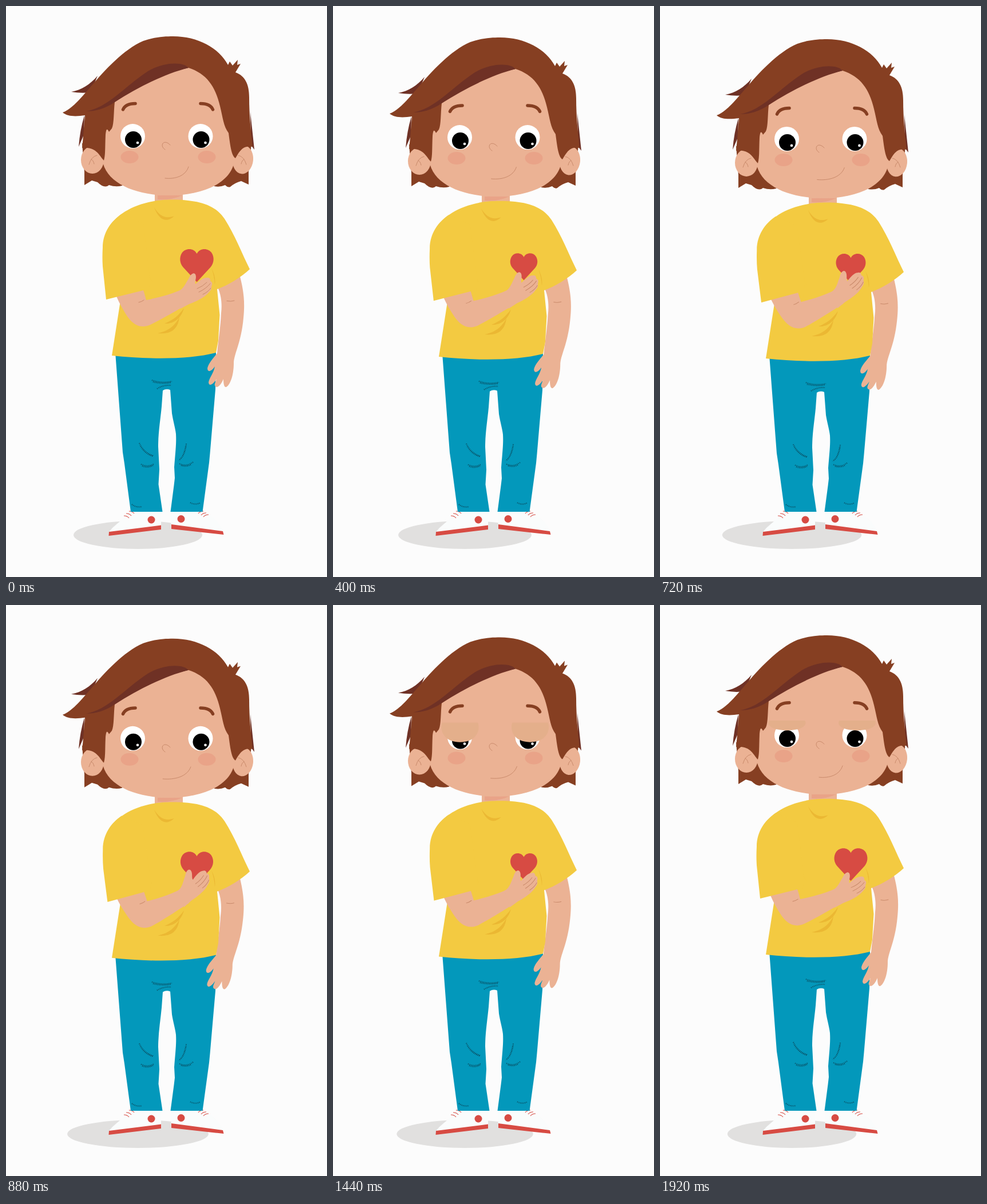
An HTML page that plays this animation: 561 by 998 pixels, repeating every 2000 ms.

```html
<!DOCTYPE html>
<html lang="en">
<head>
<meta charset="utf-8">
<title>Boy with a beating heart</title>
<style>
  html, body { margin: 0; width: 100%; height: 100%; overflow: hidden; background: #fcfcfc; }
  svg { display: block; }
  .skin { fill: #ebb294; }
  .hair { fill: #863f22; }
  .dark { fill: #6f3125; }
  .shirt { fill: #f3ca41; }
  .fold { fill: #ebb833; }
  .jeans { fill: #0398bb; }
  .red { fill: #d74b43; }
  .white { fill: #fff; }
  .shoe { fill: #fafcfc; }
  .lid { fill: #e4af8b; }
  .cheek { fill: #e9a388; }
  .line { fill: none; stroke: #c98a6b; stroke-width: 1; stroke-linecap: round; }
  .brow { fill: none; stroke: #863f22; stroke-width: 5.5; stroke-linecap: round; }
  .lace { fill: none; stroke: #d74b43; stroke-width: 1.2; }
  .crease { fill: none; stroke: #0a5368; stroke-width: 2.2; stroke-dasharray: 1.2 1.5; }
</style>
</head>
<body>
<svg width="561" height="998" viewBox="0 0 561 998">
  <ellipse id="shadow" cx="230.5" cy="924.5" rx="112.5" ry="24.5" fill="#e1e0df"/>

  <g id="shoes">
    <path class="shoe" d="M218 882H271V909L180 920C187 908 207 897 218 882z"/>
    <path class="red" d="M180 919L271 907.500V915L179.500 926z"/>
    <circle class="red" cx="254" cy="898" r="6.500"/>
    <path class="lace" d="M206 891q6 0 9 4M210 887q6 0 9 4M215 883q6 0 9 4"/>
    <path class="shoe" d="M288 882H344C358 890 374 903 380 919L289 908z"/>
    <path class="red" d="M289 906L379 918L380.500 924L289 914z"/>
    <circle class="red" cx="306" cy="896.500" r="6.500"/>
    <path class="lace" d="M345 883q-6 0 -9 4M350 886q-6 0 -9 4M354 889q-6 0 -9 4"/>
  </g>

  <g id="legs">
    <path class="jeans" d="M191 605H367L366 670L356.500 782L355 798L343.500 884H287.500L293.500 838L295 825L294 806C296 780 298 764 297 748C296 738 292 725 290 712L287 671Q280 668 274 672L272 700C270 722 266 745 266 770L268 810L266.500 836L273.500 884H218L207 800L204 780z"/>
    <path class="crease" d="M255 654Q272 660 290 656M257 657Q272 661 289 658M264 669Q275 662 288 663M233 764Q240 780 257 786M235 769Q243 783 257 787M236 801Q248 807 259 800M238 804Q248 808 257 803M315 765Q313 786 302 794M314 770Q310 789 303 793M303 800Q316 806 327 797M306 803Q316 806 324 801M220 871Q227 877 238 875M322 868Q331 873 340 868"/>
  </g>

  <g id="body">
    <path class="skin" d="M260 318H309V345H260z"/>
    <path class="cheek" d="M265 331H308Q288 340 265 338z"/>

    <g id="farArm">
      <path class="skin" d="M368 488C376 502 378 520 376 537C375 560 371 585 369 607C362 616 354 624 352 633C352 641 359 639 365 630C363 642 355 650 354 658C355 666 362 661 368 652C366 658 363 662 366 665C371 669 377 659 380 652C380 660 381 667 385 666C392 662 398 645 398 625C398 608 411 590 415 545C418 515 415 495 407 465z"/>
      <path class="line" d="M386 515.500Q393 517 399 515"/>
    </g>

    <path class="shirt" d="M259 341C275 338 300 338 318 340C347 343 369 352 382 372C400 400 412 432 426 460C410 475 388 488 369 495L373.500 540L371 585L367 606C320 618 250 618 185 611L200 515L178 390C192 365 220 348 259 341z"/>
    <path class="fold" d="M259 352C269 369 281 372 294 367C282 379 268 376 259 352zM242 443Q246 468 256 483Q246 467 242 443zM359 458Q367 473 365 487Q364 471 359 458zM303 544C300 568 285 574 265 572C284 568 294 560 303 544zM311 528C306 547 292 556 277 555C292 549 302 541 311 528z"/>

    <path id="heart" class="red" d="M0-20.500C-5-31-20-31-26-22C-31-14-30-4-24 3L0 29L24 3C30-4 31-14 26-22C20-31 5-31 0-20.500z"/>

    <g id="nearArm">
      <g id="forearm">
        <path class="skin" d="M190 500L239 492L245 514C270 509 290 503 306 496L318 521C300 531 270 549 250 558C231 565 219 553 211 541C203 528 197 518 190 500z"/>
        <path class="line" d="M232 518Q237 517 241 514"/>
        <g id="hand">
          <path class="skin" d="M300 499C310 496 314 484 319 477C323 468 328 465 331 469C334 475 329 482 331 486C338 480 346 474 351 475C355 474 358 477 357 481C361 482 361 487 359 490C360 495 357 498 354 501C346 511 328 518 320 521L305 529z"/>
          <path class="line" d="M334 494Q344 490 351 483M337 500Q350 494 357 485M344 504Q353 500 358 493"/>
        </g>
      </g>
      <path class="shirt" d="M203 363C184 375 169 396 169 422Q168 440 169 455L175 513L240 497L247 512L252 480L240 380z"/>
    </g>

    <g id="head">
      <path class="hair" d="M133 240L137 290V313L150 305L160 308Q172 320 180 313Q192 317 203 314L240 250zM429 240L424 290V312L411 306Q400 309 392 316Q388 318 383 313Q374 317 364 315L330 250z"/>
      <ellipse class="skin" cx="151" cy="269" rx="20" ry="24"/>
      <ellipse class="skin" cx="414" cy="268.500" rx="18" ry="25" transform="rotate(6 414 268)"/>
      <path class="skin" d="M168 262C168 307 223 331 285 331C347 331 400 307 400 262L385 130L319 100L180 160z"/>
      <path class="line" d="M159 261Q149 263 145 277M149 268Q153 270 154 276M406 261Q416 263 420 277M416 268Q412 270 411 276"/>
      <path class="dark" d="M114 150C132 147 147 137 160 122L148 151Q130 153 114 150zM137 191Q129 218 127 246L136 225zM427 185L434 251L428 243z"/>
      <path class="hair" d="M99 186C114 181 130 162 148 141C172 113 205 76 240 61C260 54 278 53 292 53C335 53 372 73 388 103L391 97L396 104L405 94L404 103L410 101L401 116C418 122 425 137 425 160C425 190 428 220 431 246C415 243 409 252 401 266C394 262 392 245 389 222C380 210 379 195 374 175C366 140 350 118 319 108C270 118 230 141 190 168C188 185 189 205 185 214L180 220C176 212 175 216 174 225C173 245 174 260 171 270C163 262 158 245 133 248C135 230 136 210 138 191C124 193 108 194 99 186z"/>
      <path class="dark" d="M140 184C178 178 208 140 248 114C276 97 310 97 319 108C276 119 231 142 190 168C172 180 157 184 140 184z"/>

      <ellipse class="cheek" cx="216" cy="264" rx="15.500" ry="11"/>
      <ellipse class="cheek" cx="351" cy="264" rx="15.500" ry="11"/>
      <path class="line" d="M278 251C267 244 276 231 287 243"/>
      <path class="line" id="mouth"/>
      <g id="eyes"></g>
      <path class="brow" id="brows" d="M204.500 181Q209 170.500 226 170.500M340 170.500Q357 170.500 361.500 181"/>
    </g>
  </g>
</svg>
<script>
  const LOOP = 2000, STEP = 80;
  const el = id => document.getElementById(id);
  const move = (id, transform) => el(id).setAttribute('transform', transform);
  const wave = turns => (1 - Math.cos(2 * Math.PI * turns)) / 2;
  const clamp = v => Math.max(0, Math.min(1, v));

  el('eyes').innerHTML = [[221.5, 222], [340, 344.5]].map(([x, lidX]) => `
    <circle class="white" cx="${x}" cy="227.500" r="21.500"/>
    <circle cx="${x + 1}" cy="233.500" r="14.500"/>
    <circle class="white" cx="${x + 8.5}" cy="239" r="2.300"/>
    <path class="lid" d="M${lidX - 31} 0h62c5 16 -1 49 -31 49s-36 -33 -31 -49z"/>`).join('');
  const lids = document.querySelectorAll('.lid');

  function blink(t) {
    return Math.min(clamp((t - 1280) / 230), clamp((LOOP - t) / 230));
  }

  function draw(t) {
    const sink = wave(t / LOOP);
    const beat = 1 - 0.2 * wave(t / 1000 + 0.015);
    const closed = blink(t);

    el('shadow').setAttribute('rx', 112.5 + 11.3 * sink);
    move('legs', `translate(0 884) scale(1 ${1 - 0.022 * sink}) translate(0 -884)`);
    move('body', `translate(0 ${6 * sink})`);
    move('farArm', `rotate(${0.9 * sink} 405 480)`);
    move('nearArm', `rotate(${-1.4 * sink} 190 410)`);
    move('forearm', `rotate(${-2 * sink} 225 535)`);
    move('hand', `rotate(${-10.3 * sink} 300 507)`);
    move('heart', `translate(333.5 453.5) scale(${beat})`);
    move('brows', `translate(0 ${3.8 * sink})`);
    el('mouth').setAttribute('d',
      `M${278 - 4 * sink} ${301 - 3 * sink}C${296 - sink} ${303 - 3 * sink} ` +
      `${314 + 3 * sink} ${297 - 3 * sink} ${319 + 4 * sink} ${281 - 4 * sink}`);
    for (const lid of lids) {
      lid.setAttribute('transform', `translate(0 202) scale(1 ${closed})`);
      lid.setAttribute('visibility', closed ? 'visible' : 'hidden');
    }
  }

  const start = performance.now();
  function tick() {
    const t = (performance.now() - start) % LOOP;
    draw(Math.floor(t / STEP) * STEP);
    requestAnimationFrame(tick);
  }
  tick();
</script>
</body>
</html>
```
